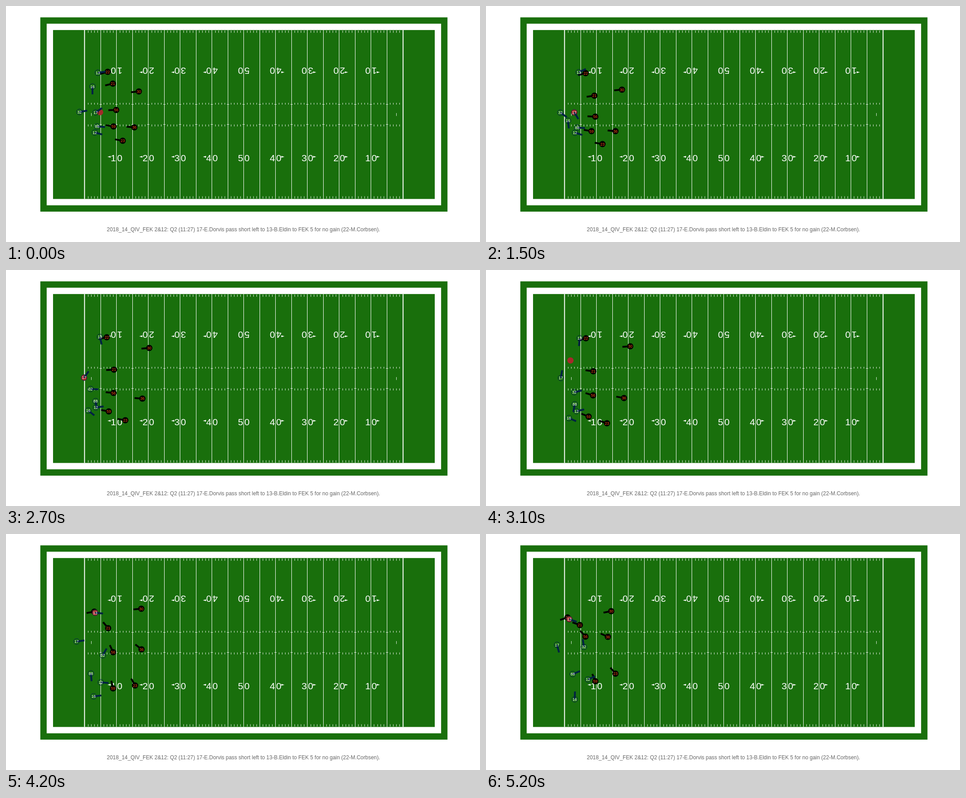
Animation, 1058 px wide and 529 px high, one loop 5300 ms. Source, as an HTML page:

```html
<!DOCTYPE html>
<html lang="en">
<head>
<meta charset="utf-8">
<style>
  html, body { margin: 0; height: 100%; overflow: hidden; background: #fff; }
  svg { display: block; width: 100vw; height: 100vh; }
  text { font-family: "Liberation Sans", Arial, sans-serif; text-anchor: middle; fill: #fff; }
  .yards { font-size: 21px; letter-spacing: 2.6px; }
  .caption { font-size: 11.9px; fill: #666; }
  .player text { font-size: 8.6px; }
  .player line { stroke-width: 4; }
  .home line { stroke: #002244; }
  .home circle { fill: none; stroke: #002244; }
  .away line { stroke: #000; }
  .away text { fill: #fb4f14; }
</style>
</head>
<body>
<svg viewBox="0 0 1058 529">
  <g id="field"></g>
  <text class="caption" x="530" y="505">2018_14_QIV_FEK 2&amp;12: Q2 (11:27) 17-E.Dorvis pass short left to 13-B.Eldin to FEK 5 for no gain (22-M.Corbsen).</text>
  <g id="away"></g>
  <circle id="ball" r="7" fill="#a52a2a"/>
  <g id="home"></g>
</svg>
<script>
const $ = id => document.getElementById(id);

// Field: everything is measured in yards from its centre
const YARD = 7.1, MID_X = 531, MID_Y = 243.2;
const pixel = x => Math.floor(x - 0.1) + 0.5;
const yardX = yard => pixel(MID_X + (yard - 50) * YARD);

function turf(margin, fill) {
  const w = (120 + 2 * margin) * YARD, h = (160 / 3 + 2 * margin) * YARD;
  return `<rect x="${MID_X - w / 2}" y="${MID_Y - h / 2}" width="${w}" height="${h}" fill="${fill}"/>`;
}

let lines = "", ticks = "", numbers = "";
for (let yard = 1; yard < 100; yard++) {
  const x = yardX(yard);
  if (yard % 5) {
    ticks += `M${x} 55v5M${x} 217v4M${x} 265.5v4.5M${x} 426.5v5`;
    continue;
  }
  lines += `M${x} 54V432.5`;
  ticks += `M${x - 2.5} 220.5h5M${x - 2.5} 265.5h5`;
  if (yard % 10) continue;
  const label = `<text class="yards" x="${x + 1.6}" y="348.3">${Math.min(yard, 100 - yard)}</text>`;
  numbers += label + `<g transform="rotate(180 ${x + 0.3} ${MID_Y})">${label}</g>`;
  if (yard !== 50) {
    const side = yard < 50 ? -1 : 1;
    for (const y of [148.5, 338])
      numbers += `<path fill="#fff" d="M${x + side * 20} ${y}l${-side * 7} -2v4z"/>`;
  }
}
for (const yard of [2, 98]) ticks += `M${yardX(yard)} 240v6.5`;

$("field").innerHTML = turf(4, "#196f0c") + turf(2, "#fff") + turf(0, "#196f0c") +
  `<path stroke="#fff" d="${lines}"/><path stroke="#fff" stroke-opacity=".85" d="${ticks}"/>` +
  `<path stroke="#fff" stroke-width="2" d="M175.3 54V432.5M886.3 54V432.5"/>` + numbers;

// Smooth path through key poses at five moments of the play
const LOOP = 5300, STEP = 100;
const moments = [0, 1500, 3100, 4200, 5200];

function along(poses, t) {
  const last = moments.length - 1;
  let k = 0;
  while (k < last - 1 && t >= moments[k + 1]) k++;
  const h = moments[k + 1] - moments[k], u = (t - moments[k]) / h, w = 1 - u;
  return poses[0].map((_, i) => {
    const slope = j => {
      const a = Math.max(j - 1, 0), b = Math.min(j + 1, last);
      return (poses[b][i] - poses[a][i]) / (moments[b] - moments[a]);
    };
    return poses[k][i] * (1 + 2 * u) * w * w + slope(k) * h * u * w * w +
      poses[k + 1][i] * u * u * (3 - 2 * u) - slope(k + 1) * h * u * u * w;
  });
}

const players = {};
function player(team, number, ...poses) {
  $(team).insertAdjacentHTML("beforeend",
    `<g class="player ${team}"><circle r="${team === "home" ? 6.5 : 7}"/><line x2="17.5"/><text y="3.1">${number}</text></g>`);
  const g = $(team).lastElementChild, stick = g.querySelector("line");
  const at = t => along(poses, t);
  const draw = (t, ball) => {
    const [x, y, turn = gaze(x, y, ball, t)] = at(t);
    g.setAttribute("transform", `translate(${x} ${y})`);
    stick.setAttribute("transform", `rotate(${turn})`);
  };
  players[number] = { at, draw };
}

// Defence: x, y
player("away", 22, [227, 147.5], [222.5, 150.5], [223, 153], [197, 174], [182, 187]);
player("away", 21, [238.5, 174], [242, 201], [239.5, 227], [228, 211], [209.5, 204]);
player("away", 30, [296.5, 191.5], [303.5, 187.5], [322, 171], [302, 167.5], [279.5, 173]);
player("away", 56, [246, 233], [244, 248], [239, 281], [239, 265], [222, 230]);
player("away", 59, [240, 270], [235.5, 280.5], [229, 328.5], [239, 346], [244, 330]);
player("away", 36, [286.5, 272], [289, 280.5], [308, 287], [302.5, 258.5], [272, 230.5]);
player("away", 23, [260.5, 302], [260, 309.5], [270, 343.5], [288, 339.5], [289, 313]);

// Offence: x, y, facing in degrees
player("home", 13, [205, 149.5, -8], [207, 148.5, -25], [209, 153, 95], [199, 176.5, 6], [186, 191, 20]);
player("home", 16, [193, 180.5, 90], [183, 257, 84], [185, 332, 23], [195.5, 364, -7], [198, 370.5, -88]);
player("home", 32, [164, 237.5, -10], [166, 239, 35], [197, 274, -13], [216, 272, -61], [218.5, 253, -98]);
player("home", 17, [200, 238.5, -34], [197, 238.5, 58], [167, 242, -80], [157.5, 241, -8], [158.5, 248.5, 75]);
player("home", 88, [203.5, 270, 4], [203.5, 272.5, 4], [198, 301, 100], [189.5, 312.5, 85], [193.5, 314, -22]);
player("home", 12, [198, 283.5, 15], [198.5, 284, 17], [202, 316.5, -13], [211.5, 332.5, 5], [227.5, 326, -24]);

// Ball: on the ground, snapped to 17, thrown, caught by 13
const snapped = 1000, held = 1400, thrown = 2800, caught = 3440;
const progress = (t, from, to) => Math.min(1, Math.max(0, (t - from) / (to - from)));
const mix = (a, b, u) => [0, 1].map(i => a[i] + (b[i] - a[i]) * u);

function ballAt(t) {
  const passer = players[17], receiver = players[13];
  if (t < held) return mix([210, 238], passer.at(held), progress(t, snapped, held));
  if (t < thrown) return passer.at(t).slice(0, 2);
  if (t < caught) return mix(passer.at(thrown), receiver.at(caught), progress(t, thrown, caught));
  return receiver.at(t).slice(0, 2);
}

// Defenders stay square to the line, then turn to the ball once it is thrown
function gaze(x, y, [ballX, ballY], t) {
  const dx = x - ballX, dy = y - ballY, u = progress(t, thrown, 4200);
  const near = Math.min(1, Math.hypot(dx, dy) / 40);
  const focus = near * (0.2 + 0.8 * u * u * (3 - 2 * u));
  return 180 + focus * Math.atan2(dy, dx) * 180 / Math.PI;
}

const start = performance.now();
function frame() {
  const elapsed = (performance.now() - start) % LOOP;
  const t = Math.floor(elapsed / STEP) * STEP;
  const ball = ballAt(t);
  for (const p of Object.values(players)) p.draw(t, ball);
  $("ball").setAttribute("transform", `translate(${ball})`);
  requestAnimationFrame(frame);
}
frame();
</script>
</body>
</html>
```
